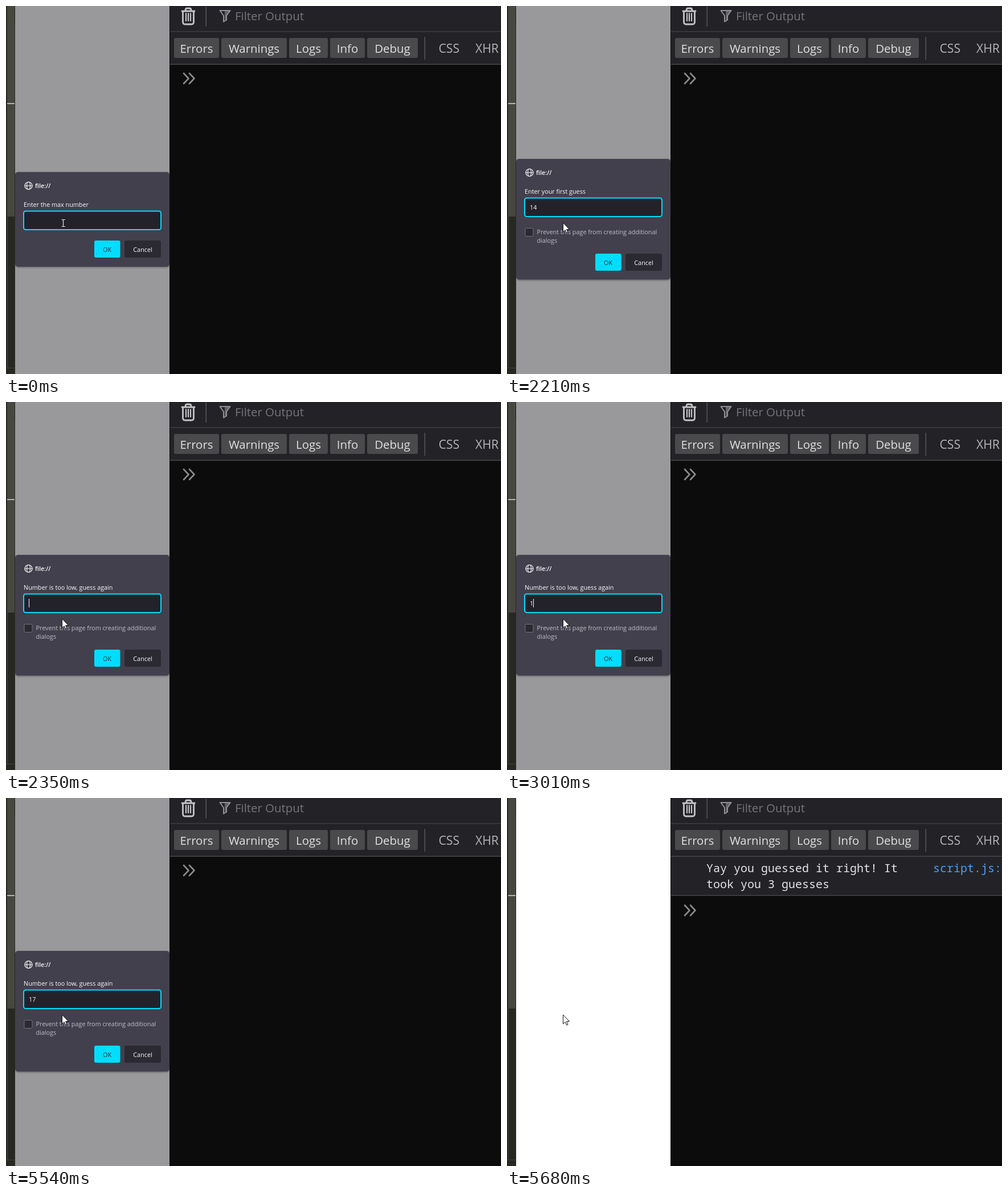
These frames come from a looping animation (869x645 px, 7070 ms). An HTML page:

```html
<!DOCTYPE html>
<html lang="en">
<head>
<meta charset="utf-8">
<title>Guessing game</title>
<style>
  html, body { margin: 0; width: 100%; height: 100%; overflow: hidden; background: #0c0c0d; }
  svg { display: block; width: 869px; height: 645px; }
  text { font-family: "Open Sans", "Noto Sans", sans-serif; white-space: pre; }
  .tool { font-size: 20.4px; fill: #e0e0e2; }
  .mid { text-anchor: middle; }
  .plain { font-size: 21.2px; fill: #b5b5b8; }
  .dialog text { font-size: 10.8px; fill: #fbfbfe; }
  .dialog .soft { fill: #bfbec6; }
  .dialog .dark { fill: #2b2a33; }
  .mono { font: 20px "Noto Sans Mono", "DejaVu Sans Mono", monospace; fill: #e4e4e6; }
  .line { fill: none; stroke-linecap: round; stroke-linejoin: round; }
</style>
</head>
<body>
<svg viewBox="0 0 869 645">
  <defs>
    <filter id="shadow" x="-10%" y="-10%" width="120%" height="120%">
      <feDropShadow dx="0" dy="1" stdDeviation="1.5" flood-color="#000" flood-opacity=".4"/>
    </filter>
    <clipPath id="pageClip"><path d="M16 0H287V645H16Z"/></clipPath>
  </defs>

  <!-- editor edge -->
  <path fill="#272822" d="M0 0H16V645H0Z"/>
  <path fill="#474740" d="M2 0H15V369H2Z"/>
  <path fill="#1d1e19" d="M15 6H16V30H15Z"/>
  <path fill="#b4b4b0" d="M2 170H15V172H2Z"/>
  <path fill="#42433c" d="M2 369H3V634H15V635H0V634H2Z"/>

  <!-- console -->
  <path fill="#0c0c0d" d="M287 0H869V645H287Z"/>
  <path fill="#232327" d="M288 0H869V102H288Z"/>
  <path fill="#3e3e42" d="M288 44H869V45.5H288Z"/>
  <path fill="#48484c" d="M288 101.5H869V103H288Z"/>
  <path fill="#55555a" d="M350.5 1H352V36H350.5ZM734.5 54H736V94H734.5Z"/>
  <g class="line" stroke="#c4c4c6" stroke-width="2.8">
    <path d="M309 9H331M315 8Q315 4 318 4H322Q325 4 325 8M310.500 10V28Q310.500 32 314.500 32H325.500Q329.500 32 329.500 28V10"/>
    <path stroke-width="2.2" d="M316 13V26M320 13V26M324 13V26"/>
  </g>
  <path fill="#626266" d="M384 9H393L386.500 17V25L384 27Z"/>
  <path class="line" stroke="#929295" stroke-width="2" d="M375.500 8H393.500L387 17V24.500L382 27.500V17Z"/>
  <text class="tool" x="402" y="25" style="fill:#75757a">Filter Output</text>
  <g id="buttons"></g>
  <text class="plain" x="759.500" y="82">CSS</text>
  <text class="plain" x="824" y="82">XHR</text>
  <g id="log">
    <path fill="#232327" d="M288 103H869V170H288Z"/>
    <path fill="#48484c" d="M288 170H869V171.500H288Z"/>
    <text class="mono" x="350" y="130">Yay you guessed it right! It</text>
    <text class="mono" x="350" y="158">took you 3 guesses</text>
    <text class="mono" x="748" y="130" style="fill:#45a1ff">script.js:</text>
  </g>
  <path id="prompt" class="line" stroke="#8b8b8e" stroke-width="2.6" d="M312 118L320.500 127L312 136M322 118L330.500 127L322 136"/>

  <!-- page and dialog -->
  <path id="page" d="M16 0H287V645H16Z"/>
  <g clip-path="url(#pageClip)">
    <g id="dialog" class="dialog">
      <rect id="panel" x="16" width="271" rx="5" fill="#42414d" filter="url(#shadow)"/>
      <g class="line" stroke="#fbfbfe" stroke-width="1.2">
        <circle cx="39.500" cy="24" r="6.500"/>
        <ellipse cx="39.500" cy="24" rx="3" ry="6.500"/>
        <path d="M33 24H46"/>
      </g>
      <text x="51" y="28" font-weight="600">file://</text>
      <text id="label" x="31" y="61"></text>
      <rect x="31" y="68.500" width="241" height="32.500" rx="3.500" fill="#23222b" stroke="#00ddff" stroke-width="2"/>
      <text id="value" x="40" y="89"></text>
      <rect id="caret" y="77" width="1" height="15" fill="#fbfbfe"/>
      <g id="prevent">
        <rect x="32" y="121.500" width="14" height="14" rx="2" fill="#2b2a33" stroke="#74737e"/>
        <text class="soft" x="52.500" y="132">Prevent this page from creating additional</text>
        <text class="soft" x="52.500" y="147">dialogs</text>
      </g>
      <g id="actions">
        <rect x="155" width="45.500" height="30" rx="3" fill="#00ddff"/>
        <text class="mid dark" x="177.500" y="20">OK</text>
        <rect x="208" width="64" height="30" rx="3" fill="#2b2a33"/>
        <text class="mid" x="240" y="20">Cancel</text>
      </g>
    </g>
  </g>
  <path id="beam" class="line" stroke="#e6e6e6" stroke-width="1.200" d="M98 374.500H100L100.500 375L101 374.500H103.500M100.500 375V386M98 386.500H100L100.500 386L101 386.500H103.500"/>
  <path id="arrow" fill="#fff" stroke="#111" d="M98.500 380V396L102.200 392.500L104.700 398L107 397L104.600 391.600H109.600Z"/>
</svg>
<script>
const LOOP = 7070;
const LABELS = {
  max: 'Enter the max number',
  first: 'Enter your first guess',
  low: 'Number is too low, guess again'
};
// start time, view, typed text, caret shown
const STEPS = [
  [0, 'max', '', 0], [200, 'max', '2', 0], [330, 'max', '20', 0],
  [530, 'first', '', 0], [600, 'first', '', 1], [1140, 'first', '', 0], [1670, 'first', '', 1],
  [2070, 'first', '1', 1], [2140, 'first', '14', 1], [2210, 'first', '14', 0],
  [2280, 'page'],
  [2350, 'low', '', 1], [2880, 'low', '', 0], [3010, 'low', '1', 1], [3410, 'low', '', 1],
  [3540, 'low', '1', 1], [3940, 'low', '', 1], [4010, 'low', '1', 1], [4270, 'low', '15', 1],
  [4470, 'low', '', 1], [5000, 'low', '', 0], [5200, 'low', '1', 1],
  [5470, 'low', '17', 1], [5540, 'low', '17', 0],
  [5610, 'page'], [5680, 'won']
];

const el = id => document.getElementById(id);
const set = (id, name, value) => el(id).setAttribute(name, value);
const show = (id, on) => { el(id).style.display = on ? '' : 'none'; };

el('buttons').innerHTML = [
  ['Errors', 295, 374], ['Warnings', 378, 493], ['Logs', 497, 565], ['Info', 569, 630], ['Debug', 634, 723]
].map(([name, left, right]) =>
  `<rect x="${left}" y="56" width="${right - left}" height="35" rx="3" fill="#4a4a4d"/>
   <text class="tool mid" x="${(left + right) / 2}" y="82">${name}</text>`).join('');

function render([, view, text = '', caret]) {
  const label = LABELS[view], isMax = view === 'max', won = view === 'won';
  set('page', 'fill', label ? '#99999b' : '#fff');
  show('dialog', label);
  show('prevent', !isMax);
  show('caret', caret);
  show('beam', isMax);
  show('arrow', !isMax);
  show('log', won);
  set('prompt', 'transform', `translate(0 ${won ? 70 : 0})`);
  set('dialog', 'transform', `translate(0 ${isMax ? 291 : 268})`);
  set('panel', 'height', isMax ? 166 : 211.5);
  set('actions', 'transform', `translate(0 ${isMax ? 120 : 166})`);
  set('caret', 'x', 40 + 6 * text.length);
  el('label').textContent = label || '';
  el('value').textContent = text;
}

let current;
function tick() {
  const time = performance.now() % LOOP;
  const step = STEPS.findLast(s => s[0] <= time);
  if (step !== current) render(current = step);
  requestAnimationFrame(tick);
}
tick();
</script>
</body>
</html>
```
